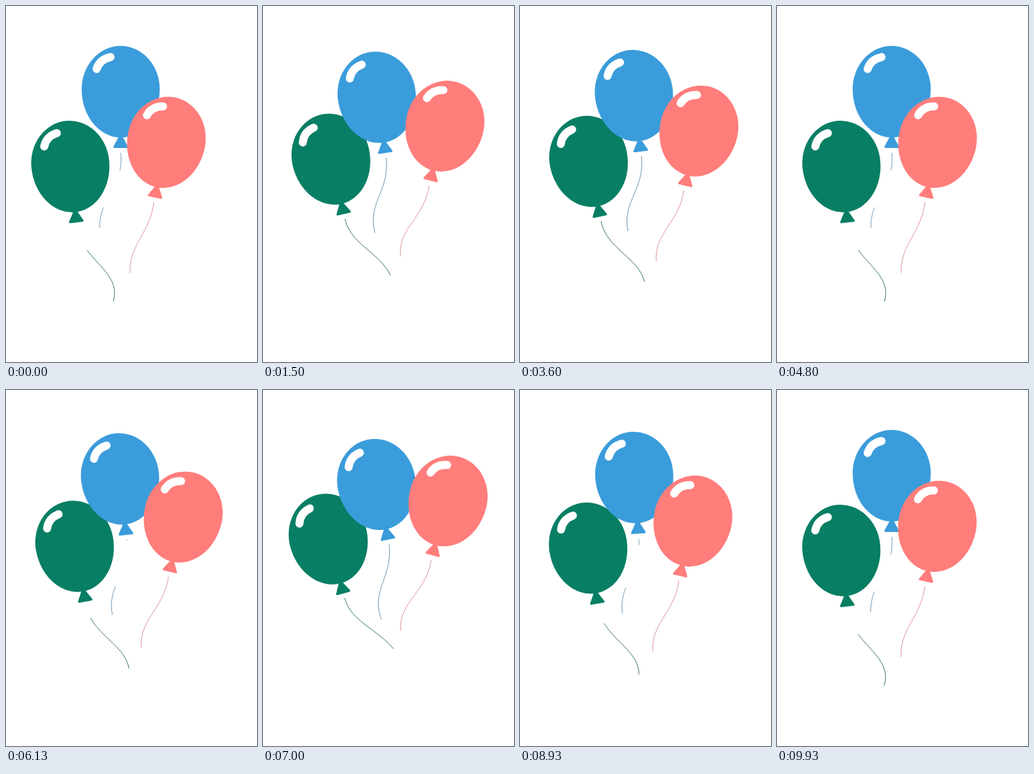
These frames come from a looping animation (360 by 509 pixels, 9960 ms). An HTML page with a canvas:

```html
<!DOCTYPE html>
<html lang="en">
<head>
<meta charset="utf-8">
<title>Balloons</title>
<style>
html, body { margin: 0; width: 100%; height: 100%; overflow: hidden; background: #fff; }
canvas { display: block; width: 360px; height: 509px; }
</style>
</head>
<body>
<canvas id="stage"></canvas>
<script>
const canvas = document.getElementById('stage');
const ctx = canvas.getContext('2d');
const ratio = window.devicePixelRatio || 1;
canvas.width = 360 * ratio;
canvas.height = 509 * ratio;

const LOOP = 9.96, SWAY = LOOP / 2, LEAD = 0.06;
const KNOT_END = 88;

// drift and lift: travel over one swing; bulge: sideways arc on the way.
// string: offset of its end from the knot; upper and lower: bends of the curve.
// The "Shift" values are added in full at the far end of the swing.
const balloons = [
  { fill: '#087e64', line: '#22665f', x: 92.5, y: 229, drift: 0, lift: -18, bulge: 6.3,
    tilt: -6, tiltShift: -10,
    string: { x: 52, y: 106, xShift: 19, yShift: -36, upper: 8, lower: 13, lowerShift: -40 },
    gap: { from: 0, to: 0.27 } },
  { fill: '#3b9cdb', line: '#5b8aa6', x: 164.5, y: 122, drift: -1.5, lift: 14, bulge: 0,
    tilt: 0, tiltShift: -12.5,
    string: { x: -30, y: 107, xShift: 20, yShift: 0, upper: 5, lower: -1, lowerShift: -15 },
    gap: { from: 0.2, to: 0.74 } },
  { fill: '#ff7d7b', line: '#dc8c8c', x: 229.5, y: 194.5, drift: 36, lift: -40, bulge: 7,
    tilt: 11.5, tiltShift: 4.5,
    string: { x: -34, y: 101, xShift: -10, yShift: 0, upper: -6, lower: -2, lowerShift: -2 },
    gap: { from: 0, to: 0 } }
];

function poseAt(b, swing) {
  return {
    x: b.x + b.drift * swing + b.bulge * 4 * swing * (1 - swing),
    y: b.y + b.lift * swing ** 1.5,
    angle: (b.tilt + b.tiltShift * swing) * Math.PI / 180
  };
}

const bezier = (u, a, b, c, d) => {
  const v = 1 - u;
  return a * v * v * v + 3 * b * u * v * v + 3 * c * u * u * v + d * u * u * u;
};

function drawString({ string, line, gap }, pose, swing) {
  const x0 = pose.x - KNOT_END * Math.sin(pose.angle);
  const y0 = pose.y + KNOT_END * Math.cos(pose.angle);
  const width = string.x + string.xShift * swing;
  const height = string.y + string.yShift * swing;
  const lower = string.lower + string.lowerShift * swing;

  const stretch = (from, to) => {
    if (to <= from) return;
    ctx.beginPath();
    for (let i = 0; i <= 40; i++) {
      const u = from + (to - from) * i / 40;
      ctx.lineTo(x0 + bezier(u, 0, string.upper, width + lower, width),
                 y0 + height * bezier(u, 0, 0.45, 0.6, 1));
    }
    ctx.stroke();
  };

  ctx.strokeStyle = line;
  ctx.lineWidth = 0.9;
  // Part of the string is missing in the lower half of the swing.
  if (swing < 0.5) {
    stretch(0, gap.from * (1 - 2 * swing));
    stretch(Math.max(0, gap.to - 0.25 * swing), 1);
  } else {
    stretch(0, 1);
  }
}

function drawBody({ x, y, angle }, fill) {
  ctx.save();
  ctx.translate(x, y);
  ctx.rotate(angle);
  ctx.lineJoin = ctx.lineCap = 'round';
  ctx.fillStyle = ctx.strokeStyle = fill;

  ctx.beginPath();
  ctx.moveTo(0, 63);
  ctx.lineTo(9, 79.5);
  ctx.lineTo(-9, 79.5);
  ctx.closePath();
  ctx.lineWidth = 3;
  ctx.fill();
  ctx.stroke();

  ctx.beginPath();
  ctx.ellipse(0, -3, 56, 62, 0, Math.PI, 2 * Math.PI);
  ctx.ellipse(0, -3, 56, 69, 0, 0, Math.PI);
  ctx.fill();

  ctx.beginPath();
  ctx.moveTo(-34.5, -32);
  ctx.quadraticCurveTo(-30, -46, -14.5, -49);
  ctx.strokeStyle = '#fff';
  ctx.lineWidth = 11.5;
  ctx.stroke();
  ctx.restore();
}

function draw(time) {
  const swing = (1 - Math.cos(2 * Math.PI * (time + LEAD) / SWAY)) / 2;
  ctx.setTransform(ratio, 0, 0, ratio, 0, 0);
  ctx.fillStyle = '#fff';
  ctx.fillRect(0, 0, 360, 509);
  for (const balloon of balloons) {
    const pose = poseAt(balloon, swing);
    drawString(balloon, pose, swing);
    drawBody(pose, balloon.fill);
  }
}

const start = performance.now();
function tick() {
  draw((performance.now() - start) / 1000 % LOOP);
  requestAnimationFrame(tick);
}
tick();
</script>
</body>
</html>
```
